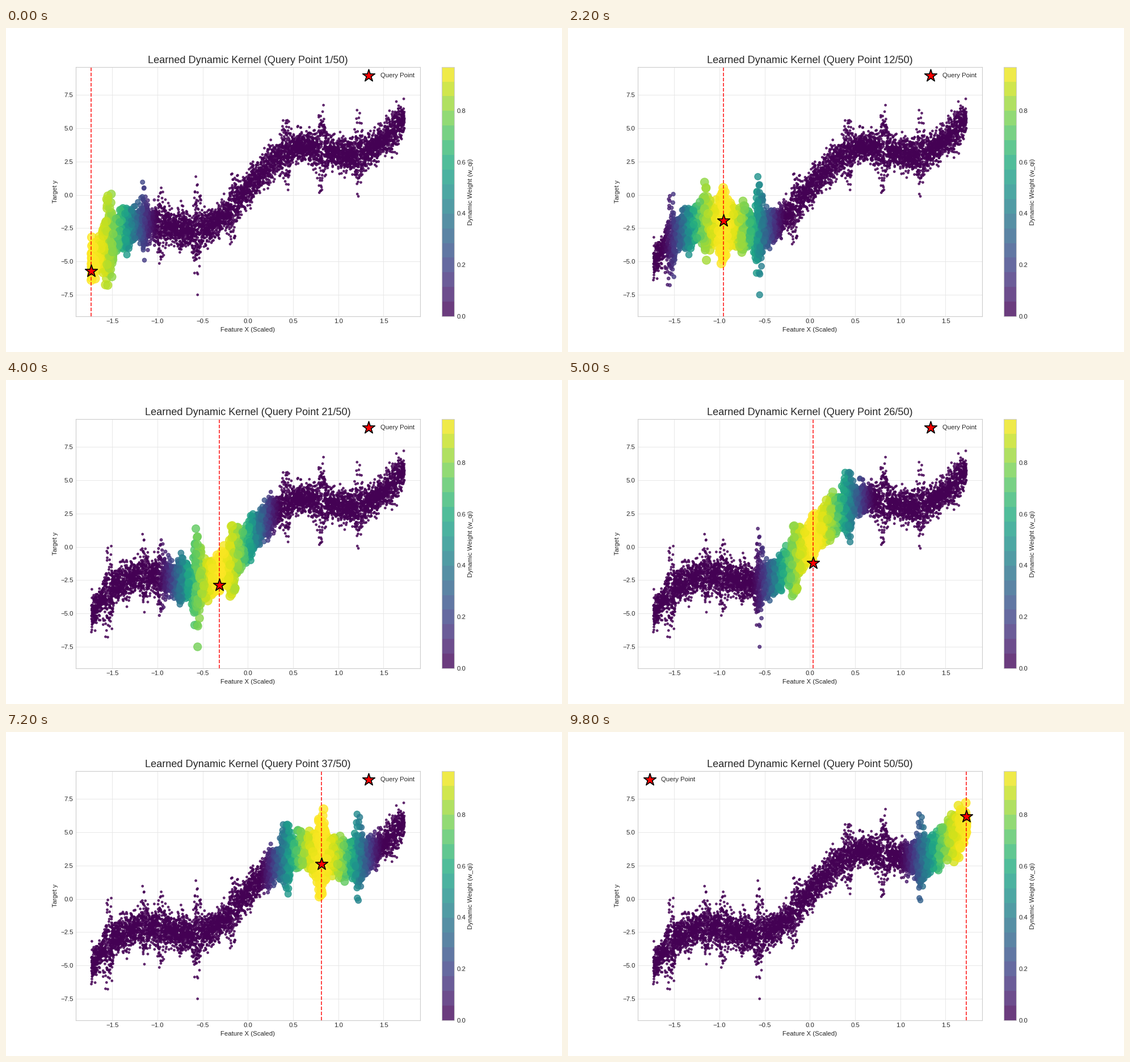
Animation, 980 px wide and 572 px high, one loop 10 s. Source, as a matplotlib script:

```python
import numpy as np
import matplotlib.pyplot as plt
from matplotlib.animation import FuncAnimation
from matplotlib.colors import ListedColormap

W, H, DPI = 980, 572, 245 / 3
FRAMES, STEP_MS = 50, 200
EDGE = np.sqrt(3)
W_MAX = 0.97
DARK, PALE = "0.15", "0.8"

plt.rcParams.update({
    "font.family": "Liberation Sans",
    "font.size": 10,
    "text.color": DARK,
    "axes.labelcolor": DARK,
    "axes.edgecolor": PALE,
    "axes.linewidth": 1,
    "axes.axisbelow": True,
    "xtick.color": DARK,
    "ytick.color": DARK,
    "xtick.major.size": 0,
    "ytick.major.size": 0,
    "legend.frameon": False,
    "legend.scatterpoints": 1,
})


def trend(x):
    return 0.45 + 3.2 * x + 1.42 * np.sin(3.57 * x)


def spread(x):
    """Base noise plus three fading trains of narrow bursts, 0.4 apart."""
    total = 0.57
    for peak in (-1.54, -0.56, 0.82):
        off = (x - peak + 0.2) % 0.4 - 0.2
        fade = np.exp(-((x - peak) / 0.62) ** 2)
        total = total + 1.15 * fade * np.exp(-(off / 0.04) ** 2)
    return total


def make_points(n=6000):
    rng = np.random.default_rng(7)
    x = rng.uniform(-EDGE, EDGE, n)
    z = rng.standard_normal(n)
    z[np.abs(z) > 3] *= 0.5
    y = trend(x) + z * spread(x)
    return x, np.clip(y, -8.27, 8.75)


def weights(x, q):
    """Bell with finite reach, a little wider near the ends of the data."""
    reach = 0.71 + 0.06 * (abs(q) / EDGE) ** 6
    u = np.clip(np.abs(x - q) / reach, 0, 1)
    return W_MAX * (1 - u ** 2) ** 2


def sizes(w):
    return 10 + 190 * w


px, py = make_points()
query_x = np.linspace(-EDGE, EDGE, FRAMES)
# The star wanders around the trend through a few key offsets
query_y = trend(query_x) + np.interp(np.arange(FRAMES),
                                     [0, 6, 15, 25, 31, 41, 49],
                                     [-0.76, 0.7, -0.05, -1.95, -0.8, -0.75, 0.34])

# The hair's breadth extra keeps rounding from losing a pixel
fig, ax = plt.subplots(figsize=((W + 0.001) / DPI, (H + 0.001) / DPI), dpi=DPI)
w0 = weights(px, query_x[0])
cloud = ax.scatter(px, py, c=w0, s=sizes(w0), cmap="viridis",
                   vmin=0, vmax=W_MAX, alpha=0.8)
line = ax.axvline(query_x[0], color="red", ls="--", lw=1.5, alpha=0.85)
star = ax.scatter([query_x[0]], [query_y[0]], marker="*", s=400, c="red",
                  edgecolors="black", linewidths=1.5, zorder=5,
                  label="Query Point")

ax.set_xlim(-1.1 * EDGE, 1.1 * EDGE)
ax.set_ylim(-9.12, 9.6)
ax.grid(color="0.9", lw=0.8)
ax.set_xlabel("Feature X (Scaled)")
ax.set_ylabel("Target y")
title = ax.set_title("", fontsize=16)
legend = ax.legend(loc="upper right")

steps = (np.arange(17) + 0.5) / 17
bands = plt.cm.ScalarMappable(plt.Normalize(0, W_MAX),
                              ListedColormap(plt.get_cmap("viridis")(steps)))
fig.colorbar(bands, ax=ax, alpha=0.8, label="Dynamic Weight (w_qi)")


def draw(i):
    q = query_x[i]
    w = weights(px, q)
    cloud.set_array(w)
    cloud.set_sizes(sizes(w))
    line.set_xdata([q, q])
    star.set_offsets([(q, query_y[i])])
    title.set_text(f"Learned Dynamic Kernel (Query Point {i + 1}/{FRAMES})")
    # The legend makes way once the line reaches it
    legend.set_loc("upper left" if q > 1.2 else "upper right")
    return cloud, line, star, title, legend


anim = FuncAnimation(fig, draw, frames=FRAMES, interval=STEP_MS,
                     repeat=True, repeat_delay=0, blit=False)
plt.show()
```
